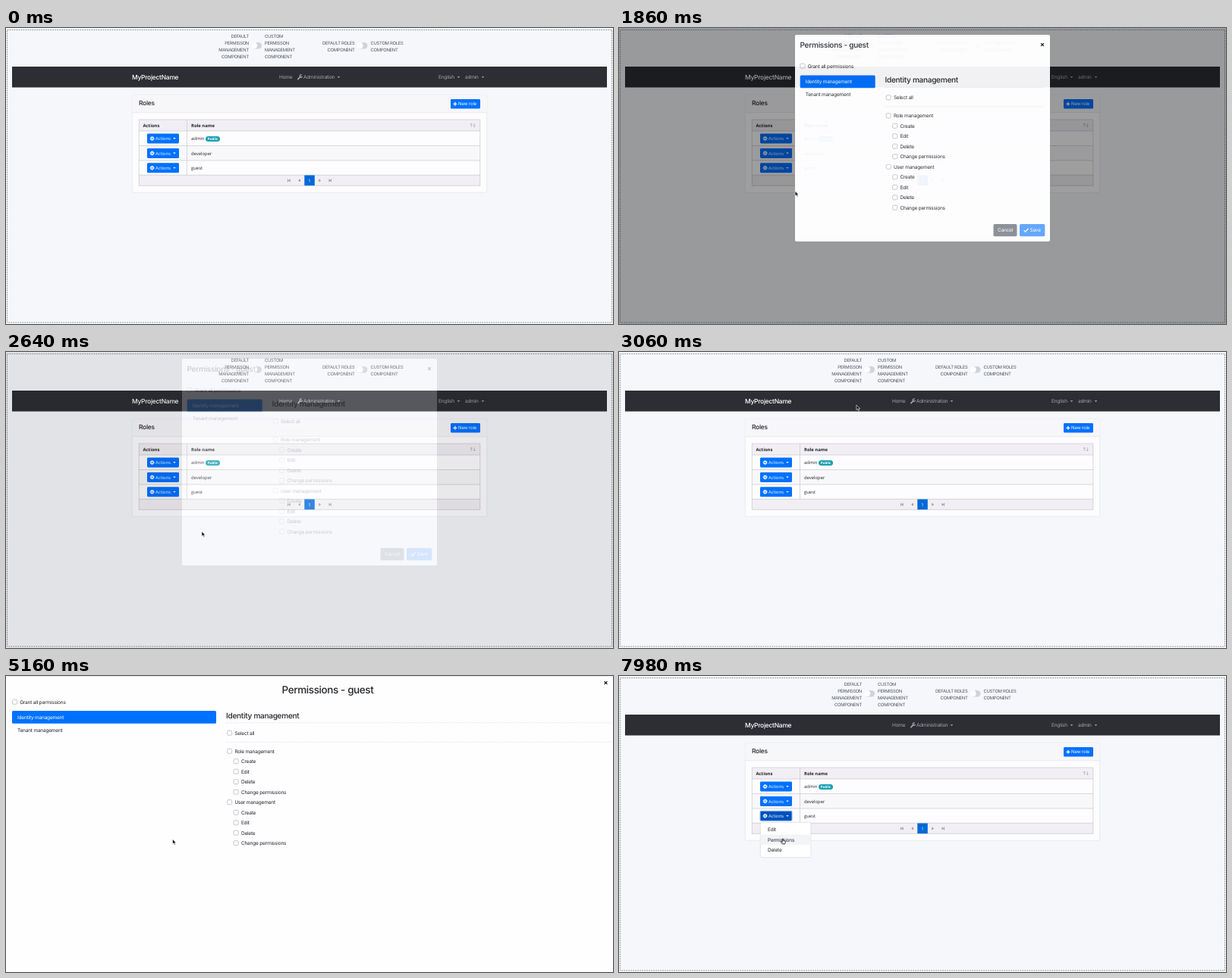
Recreate the animation shown at these times as an HTML page. Size 800 px wide and 391 px high, loop 8 s.

```html
<!DOCTYPE html>
<html lang="en">
<head>
<meta charset="utf-8">
<title>Role permissions</title>
<style>
  html, body { margin: 0; width: 100%; height: 100%; overflow: hidden; background: #f5f7fb; }
  svg { display: block; width: 100%; height: 100%; }
  text { font-family: Inter, sans-serif; letter-spacing: -.03em; text-rendering: geometricPrecision; white-space: pre; }
  text.table { font-family: "Open Sans", sans-serif; letter-spacing: 0; }
</style>
</head>
<body>
<svg id="stage" viewBox="0 0 800 391"></svg>
<script>
const LOOP = 8000;
const BLUE = '#0071ff', HOVER = '#0060dc', ACTIVE = '#0051bd', INK = '#24272b';

// Markup helpers; text is placed by its vertical centre.
const rect = (x, y, w, h, fill, extra = '') =>
  `<rect x="${x}" y="${y}" width="${w}" height="${h}" fill="${fill}" ${extra}/>`;
const path = (d, fill, extra = '') => `<path d="${d}" fill="${fill}" ${extra}/>`;
const line = (d, stroke, width = .6, extra = '') =>
  path(d, 'none', `stroke="${stroke}" stroke-width="${width}" ${extra}`);
const text = (x, y, label, { size = 6.5, fill = INK, weight = 400, anchor = 'start', cls = '', extra = '' } = {}) =>
  `<text x="${x}" y="${y + size * .36}" font-size="${size}" fill="${fill}" font-weight="${weight}" text-anchor="${anchor}" class="${cls}" ${extra}>${label}</text>`;
const caret = (x, y, fill) => path(`M${x - 1.8} ${y - .9}h3.6l-1.8 1.9z`, fill);
const cross = (x, y, r) => line(`M${x - r} ${y - r}l${2 * r} ${2 * r}m0 ${-2 * r}l${-2 * r} ${2 * r}`, '#111', 1.3);
const checkbox = (x, y) => rect(x - 3, y - 3, 6, 6, '#fff', 'rx="1.2" stroke="#adb1b7" stroke-width=".7"');
const checkRow = (x, y, label) => checkbox(x, y) + text(x + 6.7, y, label);

function labels(x, y, lines, anchor) {
  return lines.map((s, i) =>
    text(x, y + i * 8.85, s, { size: 5.9, fill: '#50545a', anchor, extra: 'style="letter-spacing:-.05em"' })).join('');
}

function toggle(id, x) {
  return rect(x, 19, 14, 8.4, '#cfd3d9', `id="${id}Track" rx="4.2"`) +
    `<circle id="${id}Knob" cx="${x + 4}" cy="23.2" r="4.1" fill="#fdfdff"/>`;
}

function actionButton(y, id) {
  return rect(186, y - 6.5, 42, 13, BLUE, `id="${id}" rx="1.4"`) +
    `<circle cx="192.6" cy="${y}" r="1.6" fill="none" stroke="#fff" stroke-width="1.4"/>` +
    `<circle cx="192.6" cy="${y}" r="2.6" fill="none" stroke="#fff" stroke-width=".9" stroke-dasharray="1.02"/>` +
    text(197, y, 'Actions', { size: 5.9, fill: '#fff', cls: 'table' }) + caret(222, y, '#fff');
}

function navBar() {
  const gray = { fill: '#a4a6aa' };
  return rect(8, 51, 784, 27.5, '#2c2e34') +
    text(166, 65, 'MyProjectName', { size: 8.43, fill: '#fff', weight: 500 }) +
    text(360, 65, 'Home', gray) +
    line('M384.8 67.6l3.2-3.2', '#a4a6aa', 1.6, 'stroke-linecap="round"') +
    line('M389.9 62.2a1.7 1.7 0 1 0 .6 1.6', '#a4a6aa', 1.2) +
    text(392, 65, 'Administration', gray) + caret(438.5, 65, gray.fill) +
    text(570, 65, 'English', gray) + caret(596.5, 65, gray.fill) +
    text(605, 65, 'admin', gray) + caret(628.5, 65, gray.fill);
}

function rolesCard() {
  const cell = { size: 5.9, cls: 'table' }, head = { ...cell, weight: 700 };
  const grid = [121, 136, 155.5, 175, 194.3, 208.3].map(y => `M175 ${y}h450`).join('') +
    'M175.3 121v87.3M624.8 121v87.3M238.5 121v73.3';
  return rect(166.3, 88.3, 467.4, 129, '#fdfdff', 'rx="2" stroke="#dfe0e4" stroke-width=".6"') +
    rect(166.6, 88.6, 466.8, 23, '#f7f6f9', 'rx="1.6"') + line('M166.5 111.7h467', '#dfe0e4') +
    text(175, 99, 'Roles', { size: 8.43, weight: 500 }) +
    rect(586, 94, 39, 12.6, BLUE, 'rx="1.4"') +
    line('M589.4 100.3h5M591.9 97.8v5', '#fff', 1.3) +
    text(596, 100.3, 'New role', { size: 6.1, fill: '#fff' }) +
    rect(175, 121, 450, 15, '#f1eff3') + rect(175, 155.5, 450, 19.5, '#f8f7fa') +
    rect(175, 194.3, 450, 14, '#f1eff3') + line(grid, '#c9c8cd', .7) +
    text(180.5, 128.5, 'Actions', head) + text(244, 128.5, 'Role name', head) +
    line('M613.3 130.8v-4.6m-1.3 1.4l1.3-1.5 1.3 1.5M617.3 126v4.6m-1.3-1.4l1.3 1.5 1.3-1.5', '#9a9a9f', .6) +
    ['admin', 'developer', 'guest'].map((name, i) => {
      const y = 146 + i * 19.4;
      return actionButton(y, `action${i}`) + text(244, y, name, cell);
    }).join('') +
    rect(263, 143, 19, 7, '#1a9fb2', 'rx="3.5"') +
    text(272.5, 146.5, 'Public', { size: 4.5, fill: '#fff', weight: 700, anchor: 'middle', cls: 'table' }) +
    rect(393.3, 194.5, 13.5, 13.6, '#0069d9') +
    text(400, 201.4, '1', { ...cell, fill: '#fff', anchor: 'middle' }) +
    path('M371.2 199.4h.8v4h-.8zM374.6 199.2v4.4l-2.4-2.2zM387.8 199.2v4.4l-2.5-2.2zM412.4 199.2v4.4l2.5-2.2zM425.6 199.2v4.4l2.4-2.2zM428.2 199.4h.8v4h-.8z', '#929297');
}

function menu() {
  return rect(186.3, 193.3, 66.6, 46.4, '#fff', 'rx="1.5" stroke="#d2d3d7" stroke-width=".6"') +
    rect(186.6, 209.6, 66, 13.3, '#f3f4f7', 'id="menuHover"') +
    ['Edit', 'Permissions', 'Delete'].map((s, i) => text(196, 203 + i * 13.4, s)).join('');
}

// Permission list shared by both dialogs; (x, y) is the heading's left centre.
function permissionList(x, y, right) {
  const group = (top, name) => checkRow(x + 4.7, top, name) +
    ['Create', 'Edit', 'Delete', 'Change permissions']
      .map((s, i) => checkRow(x + 13.2, top + 13.5 * (i + 1), s)).join('');
  return text(x, y, 'Identity management', { size: 10.1, weight: 500 }) +
    line(`M${x} ${y + 9.5}H${right}M${x} ${y + 35}H${right}`, '#dcdde1', .6, 'stroke-dasharray="2 1"') +
    checkRow(x + 4.7, y + 23, 'Select all') +
    group(y + 47, 'Role management') + group(y + 114.5, 'User management');
}

function sideTabs(x, y, width) {
  return rect(x, y, width, 16.8, BLUE, 'rx="1.5"') +
    text(x + 7, y + 8.4, 'Identity management', { fill: '#fff' }) +
    text(x + 7, y + 25.3, 'Tenant management');
}

function modal() {
  return rect(0, 0, 800, 391, '#000', 'opacity=".4"') +
    rect(232, 9, 336, 273, '#fefeff', 'rx="2"') +
    text(238.5, 22, 'Permissions - guest', { size: 10.1, weight: 500 }) + cross(558, 22, 1.9) +
    checkRow(242, 50.2, 'Grant all permissions') +
    sideTabs(238.7, 62.5, 99) + permissionList(350.5, 68.8, 560) +
    rect(493.5, 259, 31, 16.2, '#868b91', 'rx="1.7"') +
    text(509, 267.1, 'Cancel', { fill: '#fff', anchor: 'middle' }) +
    rect(528, 259, 33.3, 16.2, '#5ca3ff', 'rx="1.7"') +
    line('M533.6 267.3l2 2 4-4.4', '#fff', 1.4) + text(541.5, 267.1, 'Save', { fill: '#fff' });
}

function fullDialog() {
  return rect(0, 0, 800, 391, '#fefdff') + line('M0 .4H800', '#d9dade') +
    text(424, 18.5, 'Permissions - guest', { size: 13.5, weight: 500, anchor: 'middle' }) + cross(790.5, 9, 1.9) +
    checkRow(11.5, 34.2, 'Grant all permissions') +
    sideTabs(8, 46, 269) + permissionList(290, 52.2, 800);
}

const arrow = path('M0 0V6.4L1.5 5.1 2.6 7.6 3.8 7.1 2.7 4.7H4.7Z', '#111', 'stroke="#fff" stroke-width=".6"');
const hand = path('M-.7 .2Q0-.5 .6 .2V2.5L2.9 3.1Q3.5 3.4 3.3 4.2L2.7 6.8H-.9L-2.7 4.3Q-2.7 3.4-1.7 3.7L-.7 4.5Z',
  '#fff', 'stroke="#111" stroke-width=".8" stroke-linejoin="round"');

document.getElementById('stage').innerHTML =
  rect(0, 0, 800, 391, '#f5f7fb') +
  rect(1.5, 2.5, 797, 386.5, 'none', 'stroke="#73767c" stroke-width=".8" stroke-dasharray="1.7 1.3"') +
  labels(320, 11, ['DEFAULT', 'PERMISSON', 'MANAGEMENT', 'COMPONENT'], 'end') +
  labels(341, 11, ['CUSTOM', 'PERMISSON', 'MANAGEMENT', 'COMPONENT'], 'start') +
  labels(459.5, 19.8, ['DEFAULT ROLES', 'COMPONENT'], 'end') +
  labels(480.5, 19.8, ['CUSTOM ROLES', 'COMPONENT'], 'start') +
  toggle('permission', 323) + toggle('roles', 462.5) +
  navBar() + rolesCard() +
  `<g id="menu">${menu()}</g><g id="modal">${modal()}</g><g id="full">${fullDialog()}</g>` +
  `<g id="cursor"><g id="arrow">${arrow}</g><g id="hand">${hand}</g></g>`;

const el = Object.fromEntries([...document.querySelectorAll('[id]')].map(node => [node.id, node]));

// Pointer path: time, x, y. Repeated positions are pauses.
const route = [
  [60, 300, 307], [720, 221, 184], [1000, 221, 184], [1400, 216, 215], [1700, 216, 215],
  [1860, 232, 215.5], [2460, 258, 237], [2660, 258, 237], [3240, 329, 21], [3420, 329, 21],
  [3960, 222, 184], [4200, 222, 184], [4560, 216, 215], [4800, 216, 215], [5160, 219.5, 215.5],
  [5400, 240, 226], [5940, 780, 30], [6180, 789.5, 8], [6360, 789.5, 8], [6660, 540, 23.5],
  [6960, 329, 21], [7200, 329, 21], [7560, 222, 184], [7720, 222, 184], [7960, 216, 215], [8000, 216, 215]
];
const slope = (i, axis) => (route[i + 1][axis] - route[i][axis]) / (route[i + 1][0] - route[i][0]);
function tangent(i, axis) {
  if (i === 0 || i === route.length - 1) return 0;
  const a = slope(i - 1, axis), b = slope(i, axis);
  return a * b <= 0 ? 0 : 2 * a * b / (a + b);
}
// Monotone cubic interpolation: smooth, without overshoot at pauses.
function pointer(t, axis) {
  const i = Math.max(0, route.findLastIndex(p => p[0] <= t));
  if (i === route.length - 1) return route[i][axis];
  const span = route[i + 1][0] - route[i][0], u = Math.max(0, (t - route[i][0]) / span), v = 1 - u;
  return v * v * (1 + 2 * u) * route[i][axis] + u * u * (3 - 2 * u) * route[i + 1][axis] +
    span * u * v * (v * tangent(i, axis) - u * tangent(i + 1, axis));
}

const within = (t, from, to) => t >= from && t < to;
const show = (node, on) => node.setAttribute('display', on ? 'inline' : 'none');
const ramp = (t, start, length) => Math.min(1, Math.max(0, (t - start) / length));
const easeOut = u => 1 - (1 - u) ** 2.3;

function draw(t) {
  const x = pointer(t, 1), y = pointer(t, 2);
  const over = (left, top, right, bottom) => x >= left && x <= right && y >= top && y <= bottom;

  const menuOpen = within(t, 930, 1710) || within(t, 4140, 4780) || t >= 7680;
  const modalOpen = within(t, 1720, 2740);
  const fullOpen = within(t, 4820, 6380);
  const pageFree = !modalOpen && !fullOpen;

  show(el.menu, menuOpen);
  const item = menuOpen && over(186, 196, 253, 237) ? Math.floor((y - 196.2) / 13.4) : -1;
  show(el.menuHover, item >= 0);
  el.menuHover.setAttribute('y', 196.2 + 13.4 * item);

  const overButton = pageFree && over(186, 178, 228, 191.5);
  el.action2.setAttribute('fill', menuOpen ? ACTIVE : overButton ? HOVER : BLUE);
  el.action2.setAttribute('stroke', menuOpen ? '#86baff' : 'none');

  const on = ramp(t, 3300, 120) - ramp(t, 7060, 120);
  el.permissionKnob.setAttribute('cx', 327 + 6 * on);
  el.permissionTrack.setAttribute('fill', on > .5 ? '#1fc071' : '#cfd3d9');

  show(el.modal, modalOpen);
  el.modal.setAttribute('opacity', easeOut(ramp(t, 1720, 200)) * (1 - easeOut(ramp(t, 2540, 200))));
  show(el.full, fullOpen);

  const pointing = overButton || item >= 0 ||
    pageFree && over(323, 18, 338, 28) || fullOpen && over(786, 5, 796, 13);
  show(el.cursor, t >= 60);
  show(el.arrow, !pointing);
  show(el.hand, pointing);
  el.cursor.setAttribute('transform', `translate(${x} ${y})`);
}

const start = performance.now();
function frame() {
  draw((performance.now() - start) % LOOP);
  requestAnimationFrame(frame);
}
draw(0);
requestAnimationFrame(frame);
</script>
</body>
</html>
```
